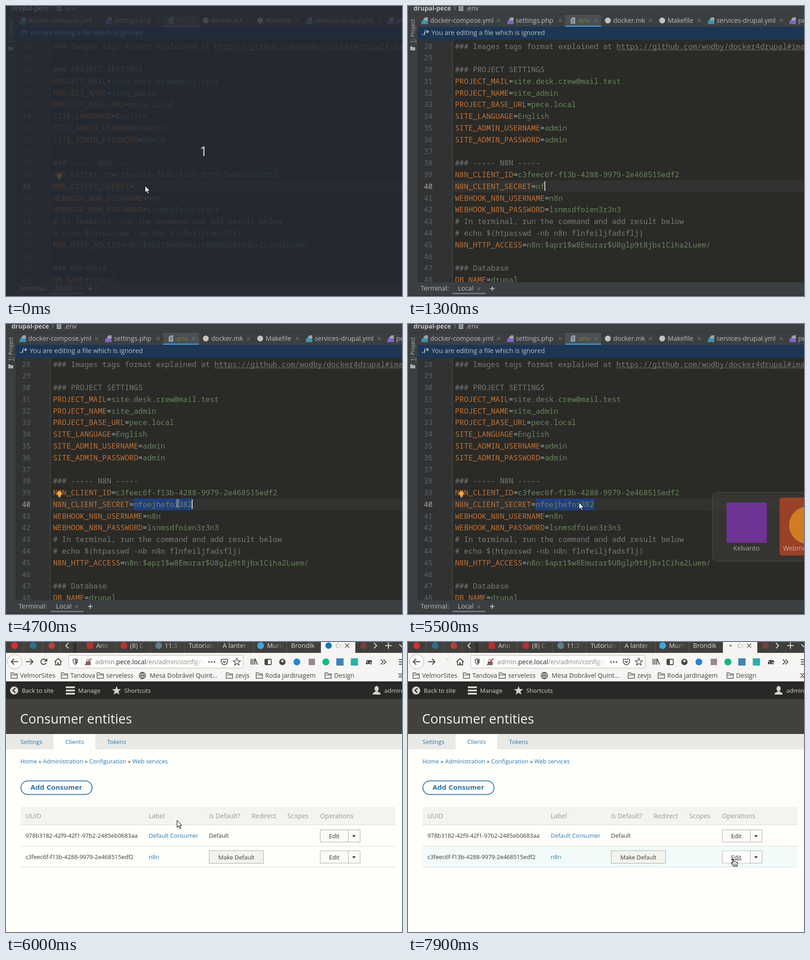
Animation, 874 px wide and 640 px high, one loop 8 s. Source, as an HTML page with a canvas:

```html
<!DOCTYPE html>
<html lang="en">
<head>
<meta charset="utf-8">
<title>Client secret setup</title>
<style>
html, body { margin: 0; width: 100%; height: 100%; overflow: hidden; background: #2a2a27; }
canvas { display: block; width: 874px; height: 640px; }
</style>
</head>
<body>
<canvas id="stage" width="874" height="640"></canvas>
<script>
const c = document.getElementById('stage').getContext('2d');
const LOOP = 8000, COL = 9.9, LEFT = 103.7, ROW = 25.78;
const ui = (px, style = '') => `${style} ${px}px "Open Sans", sans-serif`;
const mono = px => `${px}px "Noto Sans Mono", monospace`;
const CODE = mono(16.5);

const LINES = [
  '### Images tags format explained at https://github.com/wodby/docker4drupal#images-tags', '',
  '### PROJECT SETTINGS',
  'PROJECT_MAIL=site.desk.crew@mail.test',
  'PROJECT_NAME=site_admin',
  'PROJECT_BASE_URL=pece.local',
  'SITE_LANGUAGE=English',
  'SITE_ADMIN_USERNAME=admin',
  'SITE_ADMIN_PASSWORD=admin', '',
  '### ----- N8N -----',
  'N8N_CLIENT_ID=c3feec6f-f13b-4288-9979-2e468515edf2',
  'N8N_CLIENT_SECRET=',
  'WEBHOOK_N8N_USERNAME=n8n',
  'WEBHOOK_N8N_PASSWORD=lsnmsdfoien3r3n3',
  '# In terminal, run the command and add result below',
  '# echo $(htpasswd -nb n8n flnfeiljfadsflj)',
  'N8N_HTTP_ACCESS=n8n:$apr1$w8Emurar$U8glp9t8jbx1Ciha2Luem/', '',
  '### Database',
  'DB_NAME=drupal'
];
const SECRET = 'nfoejhefoi382';
// [time, characters typed]
const TYPED = [[0, 0], [1300, 2], [1400, 4], [1600, 5], [1700, 7], [1800, 8], [1900, 10], [2000, 11], [2200, 12], [2400, 13]];
// [time, x, y]
const BEAM = [[3000, 328, 398], [3200, 345, 406], [3400, 372, 408], [3700, 384, 400], [3800, 384, 400], [3900, 379, 396]];
const POINTER = [[6000, 377, 393], [6400, 377, 393], [6500, 385, 412], [6600, 385, 412], [6700, 400, 430], [6850, 470, 471],
  [7000, 575, 495], [7100, 640, 497], [7200, 690, 491], [7300, 712, 483], [7400, 717, 479]];

function along(path, t) {
  if (t <= path[0][0]) return path[0].slice(1);
  for (let i = 1; i < path.length; i++) {
    const [t0, x0, y0] = path[i - 1], [t1, x1, y1] = path[i];
    if (t < t1) {
      const k = (t - t0) / (t1 - t0);
      return [x0 + (x1 - x0) * k, y0 + (y1 - y0) * k];
    }
  }
  return path[path.length - 1].slice(1);
}
const within = (t, a, b) => t >= a && t < b;

function rect(x, y, w, h, fill) { c.fillStyle = fill; c.fillRect(x, y, w, h); }
function text(s, x, y, fill, font, align = 'left') {
  c.font = font; c.fillStyle = fill; c.textAlign = align;
  c.fillText(s, x, y);
  return x + c.measureText(s).width;
}
function fadeText(s, x, y, end, rgb, font) {
  const g = c.createLinearGradient(end - 26, 0, end, 0);
  g.addColorStop(0, `rgb(${rgb})`);
  g.addColorStop(1, `rgba(${rgb},0)`);
  text(s, x, y, g, font);
}
function disc(x, y, r, fill) { c.beginPath(); c.arc(x, y, r, 0, 7); c.fillStyle = fill; c.fill(); }
function ring(x, y, r, color, w = 1.5, from = 0, to = 7) {
  c.beginPath(); c.arc(x, y, r, from, to); c.strokeStyle = color; c.lineWidth = w; c.stroke();
}
function line(color, w, ...p) {
  c.beginPath();
  for (let i = 0; i < p.length; i += 2) c.lineTo(p[i], p[i + 1]);
  c.strokeStyle = color; c.lineWidth = w; c.stroke();
}
function poly(fill, ...p) {
  c.beginPath();
  for (let i = 0; i < p.length; i += 2) c.lineTo(p[i], p[i + 1]);
  c.closePath(); c.fillStyle = fill; c.fill();
}
function box(x, y, w, h, r, fill, stroke, lw = 1) {
  c.beginPath(); c.roundRect(x, y, w, h, r);
  if (fill) { c.fillStyle = fill; c.fill(); }
  if (stroke) { c.strokeStyle = stroke; c.lineWidth = lw; c.stroke(); }
}
function cross(x, y, r, color, w = 1.2) {
  line(color, w, x - r, y - r, x + r, y + r);
  line(color, w, x - r, y + r, x + r, y - r);
}
function star(x, y, r, fill, stroke) {
  c.beginPath();
  for (let i = 0; i < 10; i++) {
    const a = i * Math.PI / 5 - Math.PI / 2, k = i % 2 ? r * 0.42 : r;
    c.lineTo(x + Math.cos(a) * k, y + Math.sin(a) * k);
  }
  c.closePath();
  if (fill) { c.fillStyle = fill; c.fill(); }
  if (stroke) { c.strokeStyle = stroke; c.lineWidth = 1.4; c.stroke(); }
}

function arrow(x, y) {
  c.save(); c.translate(x, y); c.lineJoin = 'round';
  const p = [0.5, 0.5, 0.5, 16, 4, 12.8, 6.5, 18.5, 9, 17.4, 6.6, 12, 11.2, 12];
  poly('#fff', ...p);
  line('#111', 1.1, ...p, 0.5, 0.5);
  c.restore();
}
function beam(x, y) {
  for (const [color, w] of [['#e8e8e8', 3.2], ['#111', 1.3]]) {
    line(color, w, x, y - 7, x, y + 7);
    for (const s of [-1, 1]) line(color, w, x - 3, y + 7.5 * s, x, y + 6.5 * s, x + 3, y + 7.5 * s);
  }
}
function hand(x, y) {
  c.save(); c.translate(x - 4, y - 1); c.lineJoin = 'round';
  const p = [3, 1, 5, 1, 6, 6, 13, 8, 14.5, 10, 13.5, 16.5, 5, 16.5, 0.5, 10, 1, 8.5, 4, 10];
  poly('#fff', ...p);
  line('#111', 1.3, ...p, 3, 1);
  for (const i of [6, 8.5, 11]) line('#111', 1, i, 11, i, 14);
  c.restore();
}

function docIcon(x, y, badge) {
  poly('#9aa4aa', x, y + 4, x + 4, y, x + 10, y, x + 10, y + 14, x, y + 14);
  if (badge) rect(x - 4, y + 7, 14, 8, badge);
  else for (let i = 4; i < 12; i += 3) rect(x + 2, y + i, 6, 1, '#4c5052');
}

function editorTabs(focused) {
  rect(0, 0, 874, 75, '#3c3f41');
  text('drupal-pece', 12, 10, '#c4c4c2', ui(14, 'bold'));
  line('#85888a', 1.2, 101, 0, 105, 5, 101, 10);
  docIcon(112, -3);
  text('.env', 128, 10, '#bcbcba', ui(14.4));
  rect(0, 18, 874, 1, '#303234');
  rect(347, 19, 79, 27, '#4b4f51');
  rect(347, 43, 79, 3, focused ? '#4a88c0' : '#747a80');
  const tabs = [['docker-compose.yml', 49, 200, '#3e93a8'], ['settings.php', 238, 336, '#8064c0'], ['.env', 374, 414, ''],
    ['docker.mk', 453, 535, 0], ['Makefile', 573, 643, 0], ['services-drupal.yml', 681, 824, '#3e93a8'], ['pece', 861, 0, '#8064c0']];
  for (const [name, x, close, badge] of tabs) {
    if (badge === 0) disc(x - 12, 32, 6.5, '#c2c4c4');
    else docIcon(x - 15, 25, badge);
    text(name, x, 37, badge === '' ? '#85822c' : '#bcbcba', ui(14.4));
    if (close) cross(close, 32, 3.2, '#757879');
  }
  rect(22, 46, 852, 29, '#1c3654');
  text('.i*', 31, 64, '#c8ccd0', ui(13.5, 'italic bold'));
  text('You are editing a file which is ignored', 52, 64, '#bdc1c4', ui(14.5));
}

function codeLine(s, y) {
  if (s[0] === '#') {
    const [note, url] = s.split('https');
    const x = LEFT + note.length * COL;
    text(note, LEFT, y, '#787876', CODE);
    if (url) {
      text('https' + url, x, y, '#787876', CODE);
      rect(x, y + 2, 874 - x, 1, '#787876');
    }
    return;
  }
  const n = s.indexOf('=');
  if (n < 0) return;
  text(s.slice(0, n), LEFT, y, '#c07236', CODE);
  text('=', LEFT + n * COL, y, '#a9b3bd', CODE);
  text(s.slice(n + 1), LEFT + (n + 1) * COL, y, '#68855a', CODE);
}

function bulb(x, y) {
  disc(x, y, 5.3, '#efaa3c');
  rect(x - 2.5, y + 4, 5, 3, '#efaa3c');
  rect(x - 2.5, y + 7.5, 5, 1.2, '#b9bcbe');
}

function editor(t) {
  const typed = TYPED.filter(k => k[0] <= t).pop()[1];
  editorTabs(t >= 600);

  c.save();
  c.beginPath(); c.rect(0, 75, 874, 534); c.clip();
  rect(22, 75, 77, 534, '#303233');
  rect(98, 75, 776, 534, '#2a2a27');
  rect(22, 385, 852, 26, '#323230');
  rect(97.5, 75, 1, 534, '#555655');
  if (t >= 4200) rect(282, 385, 129.5, 26, '#213f7c');
  LINES.forEach((s, i) => {
    const y = 94.5 + i * ROW;
    text(String(28 + i), 54, y, i === 12 ? '#a6a6a4' : '#606365', mono(15.6), 'right');
    codeLine(i === 12 ? s + SECRET.slice(0, typed) : s, y);
  });
  if (t < 600 || within(t, 3400, 3900) || within(t, 4700, 5000) || t >= 5400) bulb(118, 374);
  if (within(t, 600, 3500) || within(t, 4200, 5200)) rect(LEFT + (18 + typed) * COL - 0.7, 387, 2, 21, '#d0d0ce');
  c.restore();

  rect(0, 46, 22, 563, '#3c3f41');
  rect(0, 19, 22, 30, '#3c3f41');
  rect(21, 19, 1, 590, '#323436');
  c.save();
  c.translate(15, 82); c.rotate(-Math.PI / 2);
  text('1: Project', 0, 0, '#b4b6b6', ui(12.2));
  rect(0, 2, 7, 1, '#b4b6b6');
  c.restore();
  poly('#a9adaf', 5, 89, 9, 89, 11, 91, 16, 91, 16, 98, 5, 98);

  rect(0, 609, 874, 31, '#3c3f41');
  rect(22, 609, 852, 1, '#333537');
  text('Terminal:', 28, 628, '#bcbcba', ui(14.4));
  text('Local', 110, 628, '#bcbcba', ui(14.4));
  cross(156, 624, 3.2, '#757879');
  rect(98, 633, 73, 3, '#747a80');
  rect(0, 637, 874, 3, '#35383a');
  line('#c4c6c6', 1.8, 181, 623.5, 191, 623.5);
  line('#c4c6c6', 1.8, 186, 618.5, 186, 628.5);
}

function switcher(t) {
  c.save();
  c.globalAlpha = t < 5600 ? 0.6 : 1;
  box(671.5, 371.5, 260, 152, 10, '#3d3b36', '#66655f');
  box(703, 394, 89, 89, 0, '#9433d8');
  text('Kelvanto', 747, 500, '#f0f0ee', ui(14.4), 'center');
  box(820, 383, 110, 128, 5, '#dc4a22');
  disc(882, 444, 41, '#f5a31f');
  text('Webmoor', 828, 500, '#f0f0ee', ui(14.2));
  c.restore();
  if (t < 5800) return;

  box(452.5, 540.5, 480, 140, 10, '#3c3a35', '#66655f');
  rect(478, 580, 247, 9, '#45433e');
  text('Consumer entities | Web panel', 602, 586, '#a5a39c', ui(4.6), 'center');
  for (const x of [711, 716, 721]) ring(x, 584, 1.6, '#a5a39c', 0.8);
  c.save();
  c.beginPath(); c.rect(478, 589, 247, 51); c.clip();
  c.translate(477, 589); c.scale(0.283, 0.283);
  browser(6000, 0);
  c.restore();
  text('Text notes', 805, 619, '#a5a39c', ui(4), 'center');
  rect(756, 621, 118, 5, '#45433e');
  rect(757, 622, 30, 5, '#f4f3f0');
  rect(756, 626, 118, 14, '#f4f3f0');
  for (let i = 0; i < 7; i++) rect(760 + i * 16, 629, 10, 1.5, '#a9a9a4');
  rect(756, 633, 118, 7, '#fefefc');
  rect(788, 636, 34, 2, '#b5b5b0');
}

function folder(x) {
  const s = '#555552';
  line(s, 1.4, x - 7, 68, x - 2, 68, x, 70.5, x + 7, 70.5, x + 7, 80, x - 7, 80, x - 7, 67.4);
  line(s, 1.2, x - 7, 73, x + 7, 73);
}

function tabStrip(t) {
  rect(0, 0, 874, 24, '#403f3b');
  for (const x of [39, 80, 119, 158, 241, 318, 393, 467, 546, 619]) rect(x, 0, 1, 24, '#5b5a55');
  rect(148, 0, 9, 24, '#33322f');
  const icons = [[19, '#d5302f'], [60, '#2d6f90'], [101, '#b2433c'], [260, '#b5322e'], [337, '#5c7f92'], [562, '#38a8dc'], [789, '#77403c']];
  for (const [x, fill] of icons) disc(x, 8, 7.5, fill);
  rect(178, 1, 14, 14, '#b5322e');
  const labels = [['Ano', 199, 234], ['(8) C', 274, 310], ['11:31', 350, 387], ['Tutorials', 403, 462], ['A lanter', 478, 542], ['Murmur', 576, 614]];
  for (const [s, x, end] of labels) fadeText(s, x, 13, end, '218,216,208', ui(14.4));
  text('Brondik', 629, 13, '#dad8d0', ui(14.2));
  rect(695, 0, 76, 24, '#f5f4f2');
  if (t < 7800) disc(712, 8, 7, '#1477b2');
  else disc(t < 7900 ? 708 : 712, 8, 2.4, '#8c8c88');
  fadeText('Con', 727, 13, 748, '130,130,126', ui(14.4));
  cross(753, 8, 4.5, '#555552', 1.6);
  line('#dad8d0', 2, 138, 2, 132, 8, 138, 14);
  line('#dad8d0', 2, 812, 2, 818, 8, 812, 14);
  line('#dad8d0', 2, 837, 8, 851, 8);
  line('#dad8d0', 2, 844, 1, 844, 15);
  line('#dad8d0', 2, 868, 5, 874, 11, 880, 5);
}

function toolbar(t) {
  const ink = '#484845';
  rect(0, 24, 874, 63, '#f6f5f3');
  box(3, 27.5, 32, 32, 16, '#fefefc', '#a9a9a5');
  line(ink, 2, 12, 43.5, 27, 43.5); line(ink, 2, 18, 37, 11.5, 43.5, 18, 50);
  line(ink, 2, 44, 43.5, 59, 43.5); line(ink, 2, 53, 37, 59.5, 43.5, 53, 50);
  if (t < 7900) {
    ring(83, 43.5, 6, ink, 2, 0.4, 5.6);
    poly(ink, 91, 36, 91, 43, 84, 43);
  } else ring(83, 43.5, 6, '#c9c9c5', 1.4, 4.6, 6.2);
  line(ink, 2, 107, 44, 115, 36.5, 123, 44);
  line(ink, 2, 109.5, 43, 109.5, 50.5, 120.5, 50.5, 120.5, 43);
  rect(113.5, 45, 3, 5, ink);

  box(138.5, 29.5, 385, 28, 2, '#fffffd', '#b5b5b1');
  line(ink, 1.5, 153, 37, 158, 39, 157.5, 45, 153, 50, 148.5, 45, 148, 39, 153, 37);
  rect(153, 39, 3, 8, ink);
  rect(167, 34, 1, 20, '#d4d4d0');
  rect(176, 43, 11, 8, '#6c6c68'); ring(181.5, 42, 3.5, '#6c6c68', 1.6, Math.PI, 0);
  line('#d8344c', 1.8, 174, 51, 189, 36);
  let x = text('admin.', 197, 49, '#83837f', ui(14.3));
  x = text('pece.local', x, 49, '#242422', ui(14.3));
  fadeText('/en/admin/config/se', x, 49, 439, '131,131,127', ui(14.3));
  for (const d of [448, 454, 460]) disc(d, 44, 1.7, ink);
  line(ink, 1.6, 475, 38, 489, 38, 489, 44, 486, 49, 482, 50.5, 478, 49, 475, 44, 475, 37.4);
  line(ink, 1.8, 478.5, 42, 482, 45.5, 485.5, 42);
  star(509.5, 44, 8.5, null, ink);

  for (const d of [540, 544, 548]) rect(d, 37, 2, 13, ink);
  line(ink, 2, 550, 37, 555, 50);
  box(571.5, 38, 14, 12, 2, null, ink, 1.8); rect(572, 38, 6, 12, ink);
  disc(610, 44, 7, ink); disc(610, 42, 2.6, '#f6f5f3');
  disc(642, 44, 7.5, '#1d87d6');
  rect(668, 37, 14, 14, '#9a8790');
  disc(706, 44, 7.8, '#17b887');
  rect(729, 36, 16, 16, '#3d85b8');
  rect(761, 36, 16, 16, '#28b2a4');
  text('æ', 801, 49, '#1c1c1a', ui(16, 'bold'), 'center');
  for (const d of [827, 833]) line(ink, 1.8, d, 38.5, d + 5.5, 44, d, 49.5);
  for (const d of [38, 43, 48]) rect(867, d, 14, 2, ink);

  const marks = [['VelmorSites', 31], ['Tandova', 142], ['serveless', 221], ['Mesa Dobrável Quint…', 317], ['zevjs', 506], ['Roda jardinagem', 572], ['Design', 724]];
  for (const [s, mx] of marks) {
    if (mx !== 317) folder(mx - 13);
    text(s, mx, 79, '#42423f', ui(14.1));
  }
  ring(301, 74, 7, ink); line(ink, 1.3, 294, 74, 308, 74); line(ink, 1.3, 301, 67, 301, 81);
  c.beginPath(); c.ellipse(301, 74, 3.4, 7, 0, 0, 7); c.stroke();
  for (const d of [866, 871]) line(ink, 1.6, d, 69, d + 5, 74, d, 79);
}

function editButton(y, hover, pressed) {
  box(693.5, y + 0.5, 88, 27, 0, '#fafaf7', '#a9a9a4');
  if (hover) rect(694, y + 1, 61, 26, pressed ? '#ffffff' : '#fbfbf9');
  rect(755, y, 1, 28, '#a9a9a4');
  text('Edit', 713, y + 19, '#33332f', ui(12.9));
  if (hover) rect(713, y + 20, 23, 1, '#33332f');
  poly('#33332f', 764, y + 12.5, 772, y + 12.5, 768, y + 17);
}

function browser(t, pointerY) {
  const link = '#2a78ae', dark = '#3a3a37', body = ui(12.9);
  rect(0, 0, 874, 640, '#fefefb');
  tabStrip(t);
  toolbar(t);

  rect(0, 87, 874, 39, '#282826');
  const pale = '#d4d4cf', bar = ui(13.2);
  disc(18, 107, 9, pale); line('#282826', 2.4, 20.5, 102, 15.5, 107, 20.5, 112);
  text('Back to site', 35, 112, pale, bar);
  for (const y of [98, 105, 112]) rect(132, y, 20, 4, pale);
  text('Manage', 159, 112, pale, bar);
  star(244, 107.5, 10.5, pale);
  text('Shortcuts', 261, 112, pale, bar);
  c.beginPath(); c.ellipse(818, 103, 4.6, 6, 0, 0, 7); c.fillStyle = pale; c.fill();
  poly(pale, 809, 116, 810, 112.5, 816, 109, 820, 109, 826, 112.5, 827, 116);
  text('admin', 835, 112, pale, bar);

  rect(0, 126, 874, 77, '#42413d');
  text('Consumer entities', 31, 180, '#f4f4f0', ui(29));
  rect(0, 203, 874, 34, '#e9e9e6');
  rect(105, 203, 92, 34, '#fefefb');
  text('Settings', 32, 225, link, ui(13));
  text('Clients', 131, 225, link, ui(13));
  text('Tokens', 223, 225, link, ui(13));

  let x = 32;
  ['Home', 'Administration', 'Configuration', 'Web services'].forEach((s, i) => {
    if (i) x = text(' » ', x, 268, dark, body);
    x = text(s, x, 268, link, body);
  });

  box(33, 306.5, 157, 30, 15, '#fefefb', '#3f7fad', 2);
  text('Add Consumer', 111, 326, '#3878a8', 'bold 13.9px "DejaVu Sans", sans-serif', 'center');

  const hover = pointerY >= 404 && pointerY < 450 ? 1 : pointerY >= 451 && pointerY < 496 ? 2 : 0;
  rect(32, 364, 828, 40, '#f4f4ef');
  if (hover) rect(32, hover === 1 ? 404 : 451, 828, 46, '#f2fbf9');
  for (const y of [403, 450, 496]) rect(32, y, 828, 1, '#dcdcd6');
  const heads = [['UUID', 43], ['Label', 315], ['Is Default?', 448], ['Redirect', 542], ['Scopes', 621], ['Operations', 693]];
  for (const [s, hx] of heads) text(s, hx, 389, '#979792', ui(14.2));
  text('978b3182-42f9-42f1-97b2-2485eb0683aa', 43, 432, dark, body);
  text('Default Consumer', 315, 432, link, body);
  text('Default', 448, 432, dark, body);
  text('c3feec6f-f13b-4288-9979-2e468515edf2', 43, 479, dark, body);
  text('n8n', 315, 479, link, body);
  box(448.5, 460.5, 120, 28, 0, '#f3f3ee', '#a9a9a4');
  text('Make Default', 508.5, 480, dark, body, 'center');
  editButton(414, false, false);
  editButton(460.5, t >= 7300, t >= 7700);
}

function draw(now) {
  const t = Math.floor(now % LOOP / 100) * 100;
  if (t >= 6000) {
    const [x, y] = along(POINTER, t);
    browser(t, y);
    (t >= 7300 ? hand : arrow)(x, y);
    return;
  }
  editor(t);
  if (t < 200) {
    rect(0, 0, 874, 640, 'rgba(36,41,50,.8)');
    text('1', 436, 331, '#dcdee0', ui(30), 'center');
    arrow(306.5, 396);
  }
  if (t >= 5500) switcher(t);
  if (t >= 5200) arrow(377, 393);
  else if (t >= 3000) beam(...along(BEAM, t));
}

function tick() {
  draw(performance.now());
  requestAnimationFrame(tick);
}
tick();
</script>
</body>
</html>
```
